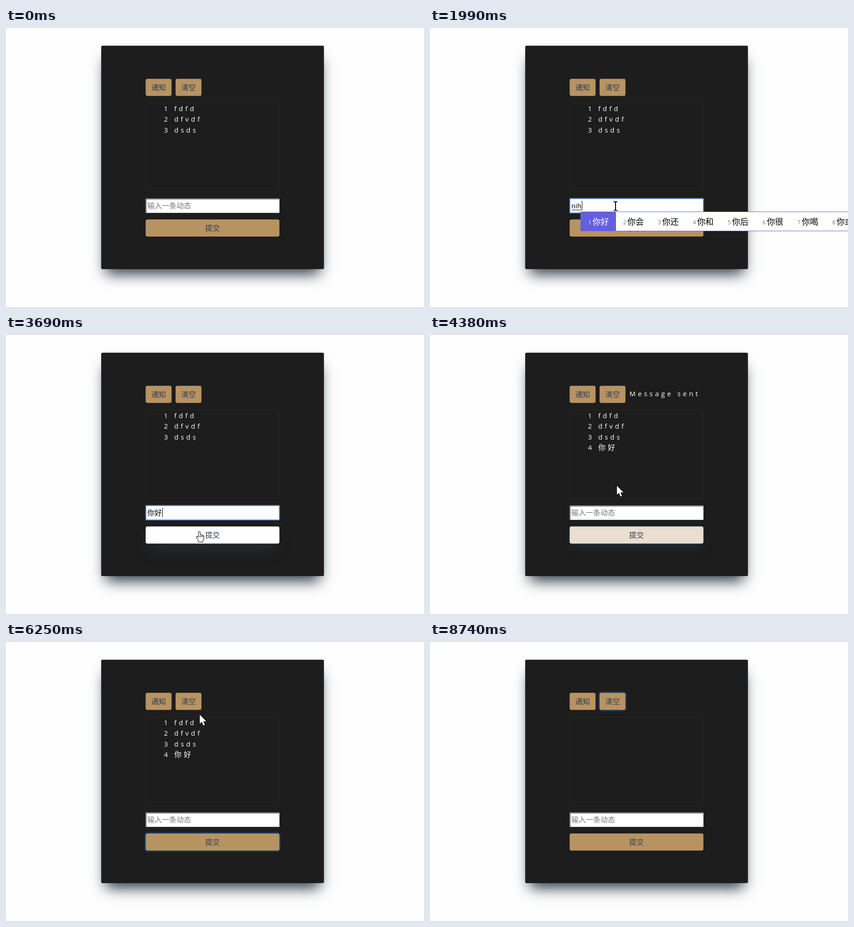
These frames come from a looping animation (917 by 611 pixels, 9750 ms). An HTML page with a canvas:

```html
<!DOCTYPE html>
<html lang="zh">
<head>
<meta charset="utf-8">
<title>通知</title>
<style>
html, body { margin: 0; width: 100%; height: 100%; overflow: hidden; background: #fefefe; }
canvas { display: block; width: 917px; height: 611px; }
</style>
</head>
<body>
<canvas id="stage" width="917" height="611"></canvas>
<script>
const W = 917, H = 611, LOOP = 9750;
const LATIN = '500 15px "Open Sans", "Noto Sans CJK SC", sans-serif';
const cjk = (size, weight = 400) => `${weight} ${size}px "Noto Sans CJK SC", "Noto Sans CJK", sans-serif`;
const ctx = document.getElementById('stage').getContext('2d');
const layer = document.createElement('canvas');
layer.width = W;
layer.height = H;
const lctx = layer.getContext('2d');

// Events in ms
const FOCUS = 820, TYPE = 1670, COMMIT = 2380, SUBMIT = 3920, LISTED = 4000;
const BLUR = 6630, CLEAR = 6710, NOTE = 2020, KEY = 160;

const CARD = { x: 208.8, y: 38.8, w: 488.7, h: 489.2 };
const FIELD = { x: 306.4, y: 373.4, w: 293.4, h: 31.4 };
const NOTIFY = { x: 306.4, y: 111.2, w: 56.8, h: 37.5, label: '通知' };
const WIPE = { ...NOTIFY, x: 372, label: '清空' };
const SEND = { ...FIELD, y: 419.2, h: 37.5, label: '提交' };

// Each glide bends toward "via" and starts where the last one stopped
const ENTRY = [796, 576];
const GLIDES = [
  { at: 70, ms: 520, via: [600, 350], to: [407, 390], even: true },
  { at: 3250, ms: 225, via: [416, 411], to: [424, 431] },
  { at: 4230, ms: 294, via: [396, 308], to: [422, 294] },
  { at: 5330, ms: 140, via: [423, 290], to: [424, 285] },
  { at: 5560, ms: 370, via: [412, 262], to: [416, 216] },
  { at: 6020, ms: 460, via: [442, 144], to: [400, 136] },
  { at: 7030, ms: 770, via: [662, 241], to: [846, 618] }
];

const between = (t, a, b) => t >= a && t < b;
const clamp = x => Math.min(1, Math.max(0, x));
const inOut = u => u < 0.5 ? 4 * u ** 3 : 1 - 4 * (1 - u) ** 3;
const inside = (r, x, y) => x >= r.x - 1 && x <= r.x + r.w && y >= r.y - 1 && y <= r.y + r.h;

// The CSS "ease" curve
function ease(x) {
  const bez = (u, a, b) => 3 * u * (1 - u) * (1 - u) * a + 3 * u * u * (1 - u) * b + u * u * u;
  let lo = 0, hi = 1;
  for (let i = 0; i < 24; i++) {
    const mid = (lo + hi) / 2;
    if (bez(mid, 0.25, 0.25) < x) lo = mid; else hi = mid;
  }
  return bez(lo, 0.1, 1);
}

const fade = (t, from) => t <= from ? 0 : ease(clamp((t - from) / 300));
const hover = (t, enter, leave) => fade(t, enter) - fade(t, leave);

function pointerAt(t) {
  let pos = ENTRY;
  for (const { at, ms, via, to, even } of GLIDES) {
    if (t < at) break;
    const u = clamp((t - at) / ms), k = even ? u : inOut(u);
    pos = pos.map((p, i) => (1 - k) ** 2 * p + 2 * k * (1 - k) * via[i] + k * k * to[i]);
  }
  return pos.map(Math.round);
}

function box(x, y, w, h, r, fill) {
  ctx.fillStyle = fill;
  ctx.beginPath();
  ctx.roundRect(x, y, w, h, r);
  ctx.fill();
}

function outline(x, y, w, h, r, color, width) {
  ctx.strokeStyle = color;
  ctx.lineWidth = width;
  ctx.beginPath();
  ctx.roundRect(x, y, w, h, r);
  ctx.stroke();
}

function text(c, str, x, y, font, color, spacing = 0, align = 'left') {
  c.font = font;
  c.letterSpacing = spacing + 'px';
  c.textAlign = align;
  c.fillStyle = color;
  c.fillText(str, x, y);
  c.letterSpacing = '0px';
}

// Shadow 0 20px 30px -10px scaled by k, cast by a shape off stage
function dropShadow({ x, y, w, h }, k) {
  const inset = 10 * k, away = 2000;
  ctx.save();
  ctx.shadowColor = `rgba(37,52,62,${(1 + 3 * k) / 4})`;
  ctx.shadowBlur = 30 * k;
  ctx.shadowOffsetX = away;
  ctx.shadowOffsetY = 20 * k;
  box(x + inset - away, y + inset, w - 2 * inset, h - 2 * inset, 0, '#000');
  ctx.restore();
}

function button(b, lit = 0, focused = false) {
  if (lit > 0) dropShadow(b, lit);
  if (focused && lit < 1) {
    const s = 3.2 * (1 - lit);
    box(b.x - s, b.y - s, b.w + 2 * s, b.h + 2 * s, 4 + s, '#163455');
  }
  const mix = c => Math.round(c + (255 - c) * lit);
  box(b.x, b.y, b.w, b.h, 4, `rgb(${mix(184)},${mix(147)},${mix(98)})`);
  text(ctx, b.label, b.x + b.w / 2, b.y + 24.8, cjk(16, 500), '#2c3e50', 0, 'center');
}

function typed(t) {
  if (between(t, TYPE, COMMIT)) return 'nih'.slice(0, 1 + Math.floor((t - TYPE) / KEY));
  return between(t, COMMIT, SUBMIT) ? '你好' : '';
}

function field(t) {
  const { x, y, w, h } = FIELD;
  box(x, y, w, h, 0, '#fff');
  if (between(t, FOCUS, SUBMIT)) {
    outline(x + 0.4, y + 0.2, w - 0.4, h, 1, '#5b89d2', 2);
  } else {
    box(x, y + h - 1, w, 1, 0, '#eee');
    box(x + w - 1, y, 1, h, 0, '#eee');
    box(x, y, w, 2, 0, '#767676');
    box(x, y, 2, h, 0, '#767676');
  }
  const str = typed(t), composing = between(t, TYPE, COMMIT);
  const font = composing ? LATIN : cjk(16);
  text(ctx, str || '输入一条动态', 310, 395, font, str ? '#000' : '#757575');
  const end = 311 + (str ? Math.floor(ctx.measureText(str).width) : 0);
  if (composing) box(311, 398, end - 311, 1, 0, '#000');

  // The caret restarts its blink with each commit
  const since = t < TYPE ? t - FOCUS : t - COMMIT;
  const lit = composing || since % 1060 < 530;
  if (between(t, FOCUS, SUBMIT) && lit) box(end, 378, 1, 21, 0, '#000');
}

function candidates(t) {
  if (!between(t, TYPE, COMMIT)) return;
  const c = lctx, str = typed(t), top = 402.5, high = 42;
  const words = { n: '你 呢 那 能 年 您 拿 哪 弄', ni: '你 呢 尼 泥 妮 拟 逆 腻 倪',
    nih: '你好 你会 你还 你和 你后 你很 你喝 你或 你回' }[str].split(' ');
  c.font = LATIN;
  const left = 308 + Math.floor(c.measureText(str).width);
  const cell = 40.5 + 18 * words[0].length, width = cell * words.length + 46;

  c.clearRect(0, 0, W, H);
  c.fillStyle = '#fff';
  c.fillRect(left, top, width, high);
  c.fillStyle = '#645fe0';
  c.fillRect(left, top, cell + 1.5, high);
  words.forEach((word, i) => {
    const x = left + 17 + i * cell;
    text(c, String(i + 1), x, 429.5, '12px "Open Sans", sans-serif', i ? '#777' : '#eee');
    text(c, word, x + 9.5, 431, cjk(18), i ? '#000' : '#fff');
  });

  const split = left + width - 43.5, cx = split + 21.5;
  c.strokeStyle = '#6a68cf';
  c.lineWidth = 1;
  c.strokeRect(left + 0.5, top, width - 1, high);
  c.strokeRect(split, top, 0, high);
  c.strokeStyle = c.fillStyle = '#333';
  c.lineWidth = 1.3;
  c.beginPath();
  c.arc(cx, 424, 8, 0, 7);
  c.moveTo(cx + 4.5, 425.5);
  c.arc(cx, 425.5, 4.5, 0, Math.PI);
  c.stroke();
  for (const dx of [-4, 2]) c.fillRect(cx + dx, 420.5, 2, 2);

  ctx.globalAlpha = clamp(0.2 + Math.floor((t - TYPE) / 80) * 0.6);
  ctx.drawImage(layer, 0, 0);
  ctx.globalAlpha = 1;
}

const ARROW = new Path2D('M0 0V20L4.6 15.8L8 24L11.2 22.6L7.8 14.8H14.5Z');
const HAND = new Path2D('M-1.5 1Q0-1 1.5 1V7Q3.5 6 4.5 7.5Q6.5 7 7.3 8.5Q9.5 8.5 9.5 10.5V15L7.5 19V22H-1.5V19L-5.5 13Q-6.5 10.5-4.5 10.5L-1.5 13Z');
const BEAM = new Path2D('M-4-9.5H-1L0-8.5L1-9.5H4M0-8.5V8.5M-4 9.5H-1L0 8.5L1 9.5H4');

function pointer(t) {
  if (!between(t, 70, 7800)) return;
  const [x, y] = pointerAt(t);
  ctx.save();
  ctx.translate(x, y);
  ctx.lineJoin = 'round';
  ctx.strokeStyle = '#000';
  ctx.lineWidth = 2;
  if (inside(FIELD, x, y)) {
    ctx.stroke(BEAM);
  } else {
    const shape = [NOTIFY, WIPE, SEND].some(b => inside(b, x, y)) ? HAND : ARROW;
    ctx.stroke(shape);
    ctx.fillStyle = '#fff';
    ctx.fill(shape);
    if (shape === HAND) {
      for (const dx of [1, 4, 7]) box(dx, 8, 1, 4, 0, '#000');
    }
  }
  ctx.restore();
}

function draw(t) {
  ctx.fillStyle = '#fefefe';
  ctx.fillRect(0, 0, W, H);
  dropShadow(CARD, 1);
  box(CARD.x, CARD.y, CARD.w, CARD.h, 3, '#1d1d1d');
  outline(306.5, 163.5, 293, 194.5, 2, '#262626', 1);

  const items = t < CLEAR ? ['fdfd', 'dfvdf', 'dsds'] : [];
  if (between(t, LISTED, CLEAR)) items.push('你好');
  items.forEach((item, i) => {
    const y = 181.5 + i * 23.5;
    text(ctx, String(i + 1), 346.5, y, LATIN, '#fff');
    text(ctx, item, 369, y, item === '你好' ? cjk(16) : LATIN, '#fff', 5);
  });

  button(NOTIFY);
  button(WIPE, hover(t, 6320, 7300), t >= CLEAR);
  button(SEND, hover(t, 3390, 4320), between(t, SUBMIT, BLUR));
  const note = between(t, SUBMIT, SUBMIT + NOTE) ? 'Message sent'
    : between(t, CLEAR, CLEAR + NOTE) ? 'cleared' : '';
  text(ctx, note, 437.5, 134, LATIN, '#fff', 5);

  field(t);
  candidates(t);
  pointer(t);
}

const start = performance.now();
function tick() {
  draw((performance.now() - start) % LOOP);
  requestAnimationFrame(tick);
}
tick();
</script>
</body>
</html>
```
